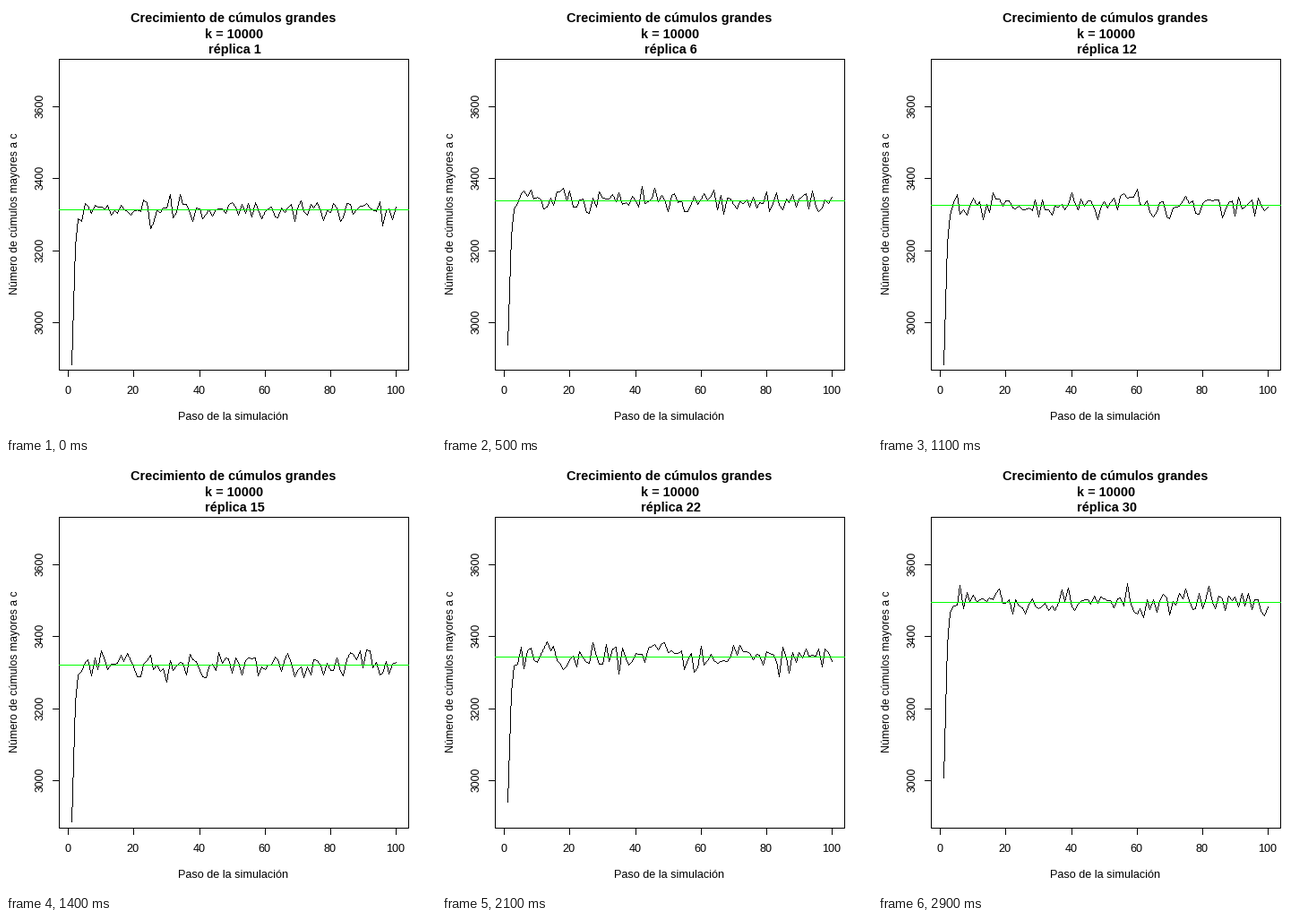
A matplotlib script for the animation above (3000 ms loop, 480x480 px).

```python
import numpy as np
import matplotlib.pyplot as plt
from matplotlib.animation import FuncAnimation
from matplotlib.collections import LineCollection

SIZE, DPI = 480, 80
PX = 72 / DPI  # points per pixel
REPLICAS, STEPS = 30, 100
LEFT, RIGHT, TOP, BOTTOM = 59.04, 449.76, 59.04, 406.56
X_LIM = (-2.96, 103.96)
Y_LIM = (2868, 3732)

# Key points of the drift between replicas
KEY_REPLICAS = [1, 6, 12, 18, 22, 27, 29, 30]
KEY_STARTS = [2884, 2937, 2882, 2888, 2940, 2892, 2892, 3008]
KEY_MEANS = [3314, 3338, 3325, 3314, 3342, 3330, 3330, 3495]


def to_x(step):
    share = (np.asarray(step) - X_LIM[0]) / (X_LIM[1] - X_LIM[0])
    return np.floor(LEFT + share * (RIGHT - LEFT))


def to_y(value):
    share = (np.asarray(value) - Y_LIM[0]) / (Y_LIM[1] - Y_LIM[0])
    return np.floor(BOTTOM - share * (BOTTOM - TOP))


def simulate(replica):
    """Fast rise to a plateau with noise around its mean."""
    rng = np.random.default_rng(replica)
    start = np.interp(replica, KEY_REPLICAS, KEY_STARTS)
    mean = np.interp(replica, KEY_REPLICAS, KEY_MEANS)
    step = np.arange(1, STEPS + 1)
    noise = rng.normal(0, 20, STEPS)
    noise[:3] = 0
    values = mean - (mean - start) * 0.24 ** (step - 1) + noise
    return step, values, mean


def pixel_trace(xs, ys):
    """One-pixel strokes along a polyline, without smoothing."""
    strokes = []
    for xa, ya, xb, yb in zip(xs, ys, xs[1:], ys[1:]):
        count = int(max(abs(xb - xa), abs(yb - ya))) + 1
        for x, y in zip(np.linspace(xa, xb, count).round(),
                        np.linspace(ya, yb, count).round()):
            strokes.append([(x + 0.5, y), (x + 0.5, y + 1)])
    return strokes


def line(xs, ys, color="black", **kw):
    return ax.plot(xs, ys, color=color, lw=PX, snap=False,
                   solid_capstyle="butt", solid_joinstyle="miter", **kw)[0]


def label(x, y, text, size=12.6, **kw):
    return ax.text(x, y, text, size=size * PX, ha="center", va="baseline",
                   rotation_mode="anchor", **kw)


def upright(x, y, text):
    return label(x, y, text, 12.3, rotation=90)


def heading(x, y, text):
    return label(x, y, text, 14.55, weight="bold")


plt.rcParams["font.family"] = "Liberation Sans"
fig = plt.figure(figsize=(SIZE / DPI, SIZE / DPI), dpi=DPI, facecolor="white")
ax = fig.add_axes([0, 0, 1, 1])
ax.set(xlim=(0, SIZE), ylim=(SIZE, 0))
ax.axis("off")

x0, x1, y0, y1 = 59.5, 449.5, 59.5, 406.5
curve = ax.add_collection(LineCollection([], colors="black", linewidths=PX))
curve.set_snap(False)
average = line([x0 - 0.5, x1 + 0.5], [0, 0], "#00ff00", zorder=3)
line([x0, x1, x1, x0, x0, x1], [y0, y0, y1, y1, y0, y0])

for tick in range(0, 101, 20):
    x = float(to_x(tick)) + 0.5
    line([x, x], [y1, y1 + 7.5])
    label(x - 1, 433, str(tick))
for tick in range(3000, 3601, 200):
    y = float(to_y(tick)) + 0.5
    line([x0 - 7.5, x0], [y, y])
    upright(42, y - 1, str(tick))

label(253.5, 462, "Paso de la simulación")
upright(13, 231.5, "Número de cúmulos mayores a c")
heading(253.5, 18, "Crecimiento de cúmulos grandes")
heading(255, 36, "k = 10000")
caption = heading(255, 53, "")


def draw(frame):
    replica = frame + 1
    step, values, mean = simulate(replica)
    curve.set_segments(pixel_trace(to_x(step), to_y(values)))
    y = float(to_y(mean)) + 0.5
    average.set_ydata([y, y])
    caption.set_text(f"réplica {replica}")
    return curve, average, caption


anim = FuncAnimation(fig, draw, frames=REPLICAS, interval=100, repeat=True)
plt.show()
```
